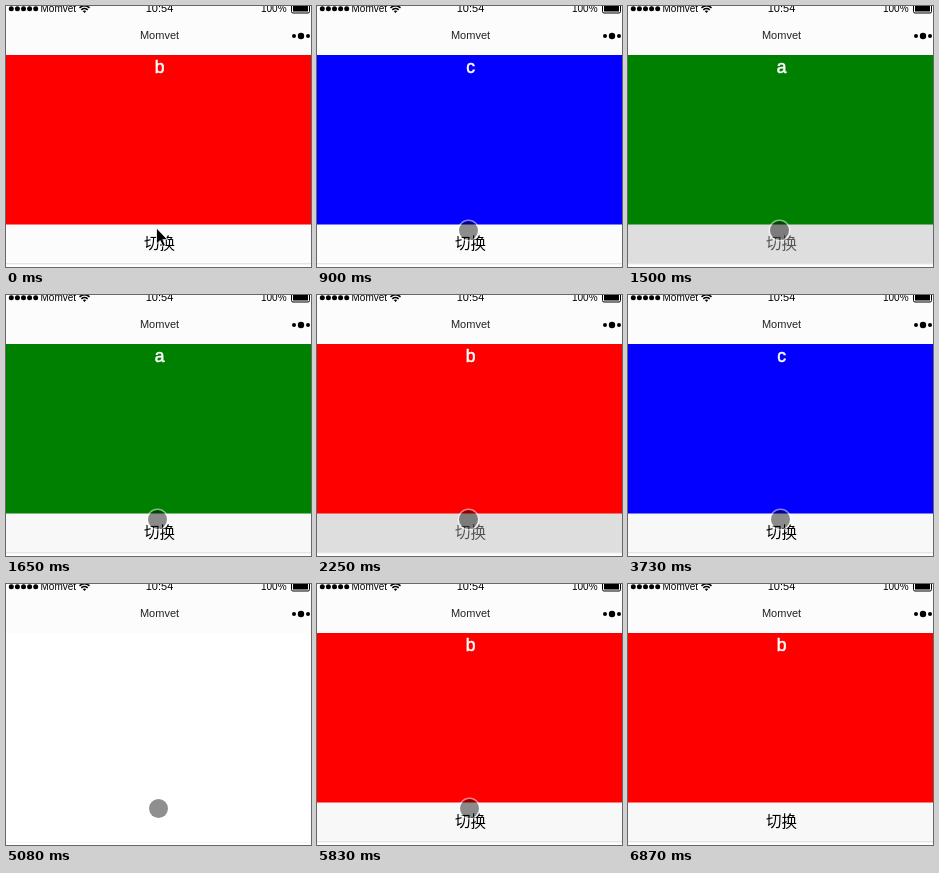
Recreate the animation shown at these times as an HTML page. Size 305 by 261 pixels, loop 7.32 s.

```html
<!DOCTYPE html>
<html lang="zh">
<head>
<meta charset="utf-8">
<title>切换</title>
<style>
  html, body { margin: 0; width: 100%; height: 100%; overflow: hidden; background: #fff; }
  svg { display: block; width: 100%; height: 100%; }
  text { font-family: "Liberation Sans", Arial, sans-serif; }
  .middle { text-anchor: middle; }
  #letter { font-size: 17.5px; fill: #fff; stroke: #fff; stroke-width: .55; }
  #label { font-family: "Noto Sans CJK SC", "Noto Sans CJK", sans-serif; font-size: 15.5px; }
</style>
</head>
<body>
<svg viewBox="0 0 305 261">
  <rect width="305" height="261" fill="#fff"/>
  <rect y="258" width="305" height="1" fill="#f5f5f5"/>

  <g id="page">
    <rect id="button" y="218" width="305" height="39"/>
    <rect id="panel" y="49" width="305" height="169.5"/>
    <text id="letter" class="middle" x="153.5" y="66.5"></text>
    <rect y="257" width="305" height="1" fill="#e4e4e4"/>
    <text id="label" class="middle" x="153.5" y="242.7">切换</text>
  </g>

  <rect width="305" height="49" fill="#fcfcfc"/>
  <g id="signal"></g>
  <text x="34.5" y="6" font-size="10">Momvet</text>
  <g fill="none" stroke="#000" stroke-width="1.5">
    <path d="M73.5 1.8Q78.5-2.2 83.5 1.8M75.3 3.9Q78.5 1.3 81.7 3.9"/>
    <path d="M76.7 5L78.5 7L80.3 5Q78.5 3.8 76.7 5Z" fill="#000" stroke="none"/>
  </g>
  <text class="middle" x="153.5" y="6" font-size="11">10:54</text>
  <text x="255" y="6" font-size="10">100%</text>
  <rect x="285.5" y="-1.5" width="18" height="8.5" rx="1.5" fill="none" stroke="#000"/>
  <rect x="287" y="0" width="15" height="5.5"/>
  <text class="middle" x="153.5" y="33" font-size="11" fill="#222">Momvet</text>
  <circle cx="288" cy="30" r="2"/>
  <circle cx="295" cy="30" r="3.2"/>
  <circle cx="302" cy="30" r="2"/>

  <path id="arrow" d="M150.5 222V238L154.2 234.6L156.8 240.5L159.3 239.4L156.8 233.6H161.5Z"
        stroke="#fff" stroke-width=".8"/>
  <g id="touch">
    <circle r="10.2" fill="none" stroke="#fff" stroke-opacity=".5" stroke-width="1.6"/>
    <circle r="9.5" fill-opacity=".44"/>
  </g>
</svg>
<script>
const LOOP = 7320;
const $ = id => document.getElementById(id);

const views = {
  a: "#008000",
  b: "#ff0000",
  c: "#0400ff"
};

// Each track lists [start in ms, value]; values hold until the next start.
const tracks = {
  view: [[0, "b"], [900, "c"], [1500, "a"], [2250, "b"], [3140, "c"], [5680, "b"]],
  pageX: [[0, 0], [5080, null], [5680, 233], [5830, 0]],
  button: [[0, "#fcfcfc"], [1500, "#dedede"], [1650, "#f8f8f8"], [2250, "#dedede"], [2390, "#f8f8f8"]],
  touch: [[0, null], [300, [151.5, 224.5]], [2990, [152.5, 224.5]], [6280, [157.5, 224.5]],
          [6430, [261.5, 235.5]], [6580, [262.5, 235.5]], [6720, [291.5, 256.5]], [6870, null]]
};

const valueAt = (track, time) => track.findLast(([start]) => start <= time)[1];
const set = (id, name, value) => $(id).setAttribute(name, value);
const show = (id, visible) => set(id, "visibility", visible ? "visible" : "hidden");

$("signal").innerHTML = Array.from({ length: 5 }, (_, i) =>
  `<circle cx="${5.3 + 6.1 * i}" cy="2.8" r="2.5"/>`).join("");

function render(time) {
  const view = valueAt(tracks.view, time);
  set("panel", "fill", views[view]);
  $("letter").textContent = view;

  const pageX = valueAt(tracks.pageX, time);
  show("page", pageX !== null);
  set("page", "transform", `translate(${pageX ?? 0} 0)`);

  const color = valueAt(tracks.button, time);
  set("button", "fill", color);
  set("label", "fill", color === "#dedede" ? "#555" : "#000");

  const touch = valueAt(tracks.touch, time);
  show("touch", touch);
  if (touch) set("touch", "transform", `translate(${touch})`);
  show("arrow", time < 300);
}

const begin = performance.now();
function tick() {
  render((performance.now() - begin) % LOOP);
  requestAnimationFrame(tick);
}
tick();
</script>
</body>
</html>
```
